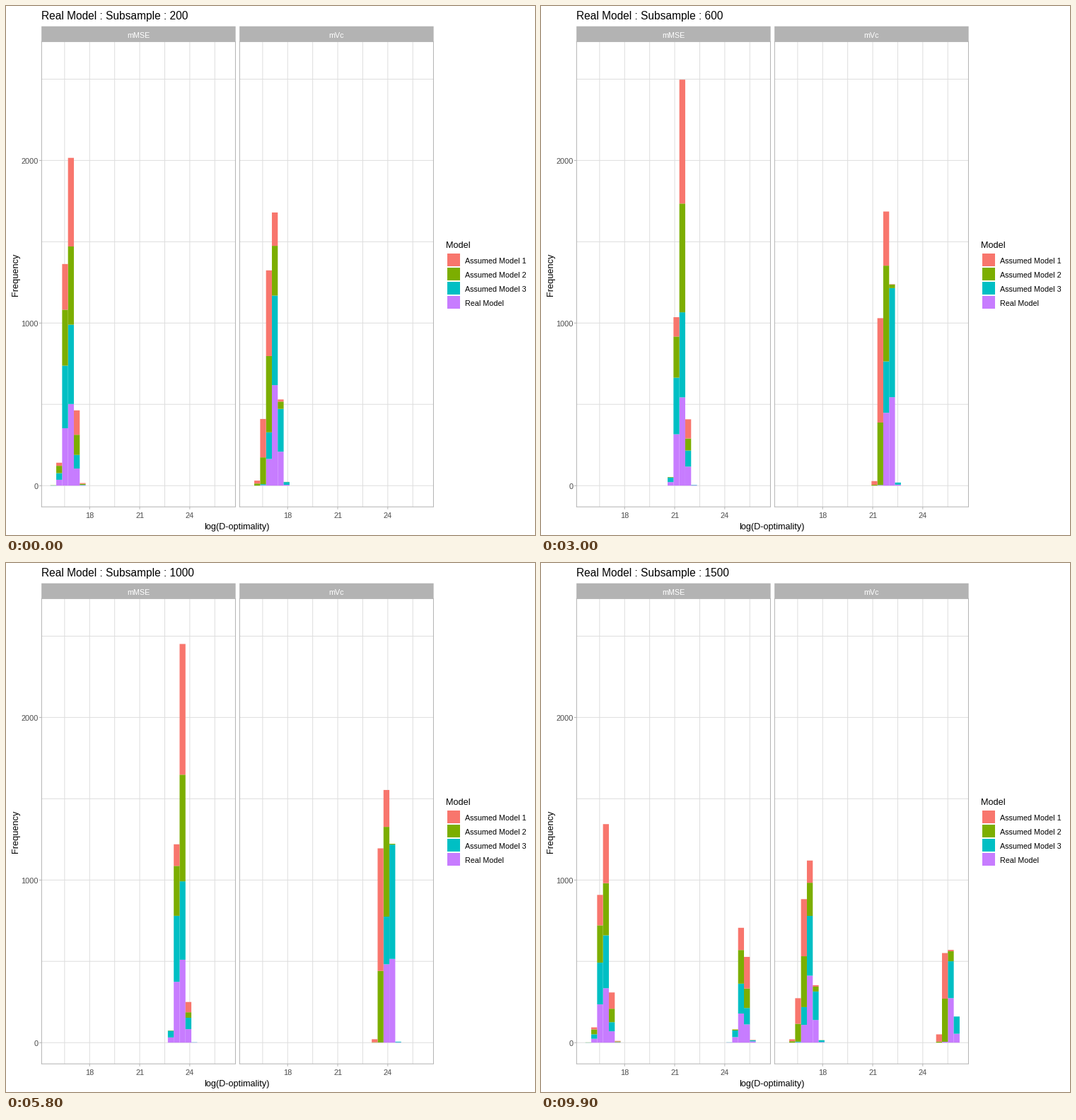
Animation of 748 by 748 pixels, one loop 10 s. Source, as a matplotlib script:

```python
import math

import matplotlib.pyplot as plt
import numpy as np
from matplotlib.animation import FuncAnimation
from matplotlib.patches import Rectangle

SIZE, BINS = 748, 30
BIN_X0, BIN_W = 62.75, 8.306      # first bin edge and bin width, in px
LEFT, WIDTH, PITCH = 50.35, 274.1, 280
TOP, BOTTOM = 50.4, 708.2
BASE_Y, PX_PER_COUNT = 678.2, 0.2299
PURPLE, TEAL, GREEN, RED = "#C77CFF", "#00BFC4", "#7CAE00", "#F8766D"
STACK = [PURPLE, TEAL, GREEN, RED]
GRID, BORDER, AXIS_TEXT = "#DEDEDE", "#B3B3B3", "#4D4D4D"

SIZES = list(range(200, 1600, 100))
REACHED = [0, 7, 15] + list(range(23, 101, 7))   # frame at which each state is complete
SAMPLES = 1000

# Per model, bottom of the stack first: mean at size 200 and its growth per
# log size, then the spread's limit and its 1/n part (all in bin widths).
MMSE = [(3.185, 11.25, 0.61, 10), (3.12, 11.25, 0.62, 5),
        (3.20, 11.28, 0.36, 70), (3.34, 11.32, 0.31, 68)]
MVC = [(4.55, 11.27, 0.28, 58), (4.62, 11.32, 0.23, 84),
       (3.71, 11.20, 0.27, 100), (3.46, 11.16, 0.27, 85)]
PANELS = [("mMSE", 18, MMSE), ("mVc", 27, MVC)]   # name, sizes lost to the pilot


def model_counts(n, lost, start, growth, spread, extra):
    """Histogram of a normal whose mean follows the log of the sample size."""
    mean = start + growth * math.log((n - lost) / (200 - lost))
    sd = spread + extra / n
    cdf = [0.5 * (1 + math.erf((e - mean) / sd / math.sqrt(2)))
           for e in range(BINS + 1)]
    return SAMPLES * np.diff(cdf)


def state(n):
    """Counts by panel, model and bin."""
    return np.rint([[model_counts(n, lost, *m) for m in models]
                    for _, lost, models in PANELS])


states = [state(n) for n in SIZES]

fig = plt.figure(figsize=(SIZE / 72, SIZE / 72), dpi=72, facecolor="white")
ax = fig.add_axes([0, 0, 1, 1])
ax.set_xlim(0, SIZE)
ax.set_ylim(SIZE, 0)
ax.axis("off")


def box(x, y, w, h, color, z=1):
    return ax.add_patch(Rectangle((x, y), w, h, facecolor=color, linewidth=0,
                                  snap=False, zorder=z))


def hline(x, y, w, color, z=1):
    box(x, y - 0.5, w, 1, color, z)


def vline(x, y, h, color, z=1):
    box(x - 0.5, y, 1, h, color, z)


def label(x, y, text, size, color="black", ha="left", **kw):
    return ax.text(x, y, text, fontsize=size, color=color, ha=ha,
                   va="baseline", family="Liberation Sans", zorder=5, **kw)


def draw_panel(x, name):
    for i in range(7):
        gx = x + 32.5 + 35.4 * i
        vline(gx, TOP, BOTTOM - TOP, GRID)
        if i in (1, 3, 5):
            vline(gx, BOTTOM, 3.5, BORDER)
            label(gx + 0.2, 724, str(15 + 3 * (i + 1) // 2), 11, AXIS_TEXT, "center")
    for count in range(0, 2501, 500):
        hline(x, BASE_Y - PX_PER_COUNT * count, WIDTH, GRID)
    for y in (TOP, BOTTOM):
        hline(x - 0.5, y, WIDTH + 1, BORDER, 4)
    for edge in (x, x + WIDTH):
        vline(edge, TOP, BOTTOM - TOP, BORDER, 4)
    box(x - 0.2, 28.7, WIDTH + 0.4, TOP - 28.7, BORDER)
    label(x + WIDTH / 2, 45, name, 10.7, "white", "center")


for p, (name, _, _) in enumerate(PANELS):
    draw_panel(LEFT + PITCH * p, name)
for count in (0, 1000, 2000):
    y = BASE_Y - PX_PER_COUNT * count
    hline(LEFT - 3.5, y, 3.5, BORDER)
    label(45.5, y + 4.8, str(count), 11, AXIS_TEXT, "right")

label(326, 740, "log(D-optimality)", 12.6, ha="center")
label(17.5, 379.5, "Frequency", 12.8, ha="center", rotation=90,
      rotation_mode="anchor")

label(622.5, 342, "Model", 12.7)
legend = ["Assumed Model 1", "Assumed Model 2", "Assumed Model 3", "Real Model"]
for i, (name, color) in enumerate(zip(legend, reversed(STACK))):
    box(624, 350 + 20 * i, 18, 18, color)
    label(649, 364 + 20 * i, name, 10.7)

title = label(50, 19, "", 15.5)

bars = [[[box(BIN_X0 + PITCH * p + BIN_W * k, BASE_Y, BIN_W, 0, color, 3)
          for k in range(BINS)] for color in STACK] for p in range(len(PANELS))]


def update(frame):
    i = max(j for j in range(len(SIZES)) if REACHED[j] <= frame)
    steps = 4 if i < 3 else 3
    t = max(0, frame - REACHED[i + 1] + steps) / steps
    counts = (1 - t) * states[i] + t * states[(i + 1) % len(states)]
    heights = PX_PER_COUNT * counts
    tops = BASE_Y - heights.cumsum(axis=1)
    for index in np.ndindex(counts.shape):
        p, m, k = index
        bar = bars[p][m][k]
        bar.set_visible(heights[index] > 0)
        bar.set_y(tops[index])
        bar.set_height(heights[index])
    title.set_text(f"Real Model : Subsample : {SIZES[i]}")
    return [title]


anim = FuncAnimation(fig, update, frames=100, interval=100,
                     init_func=lambda: update(0), repeat=True,
                     repeat_delay=0, blit=False)
plt.show()
```
